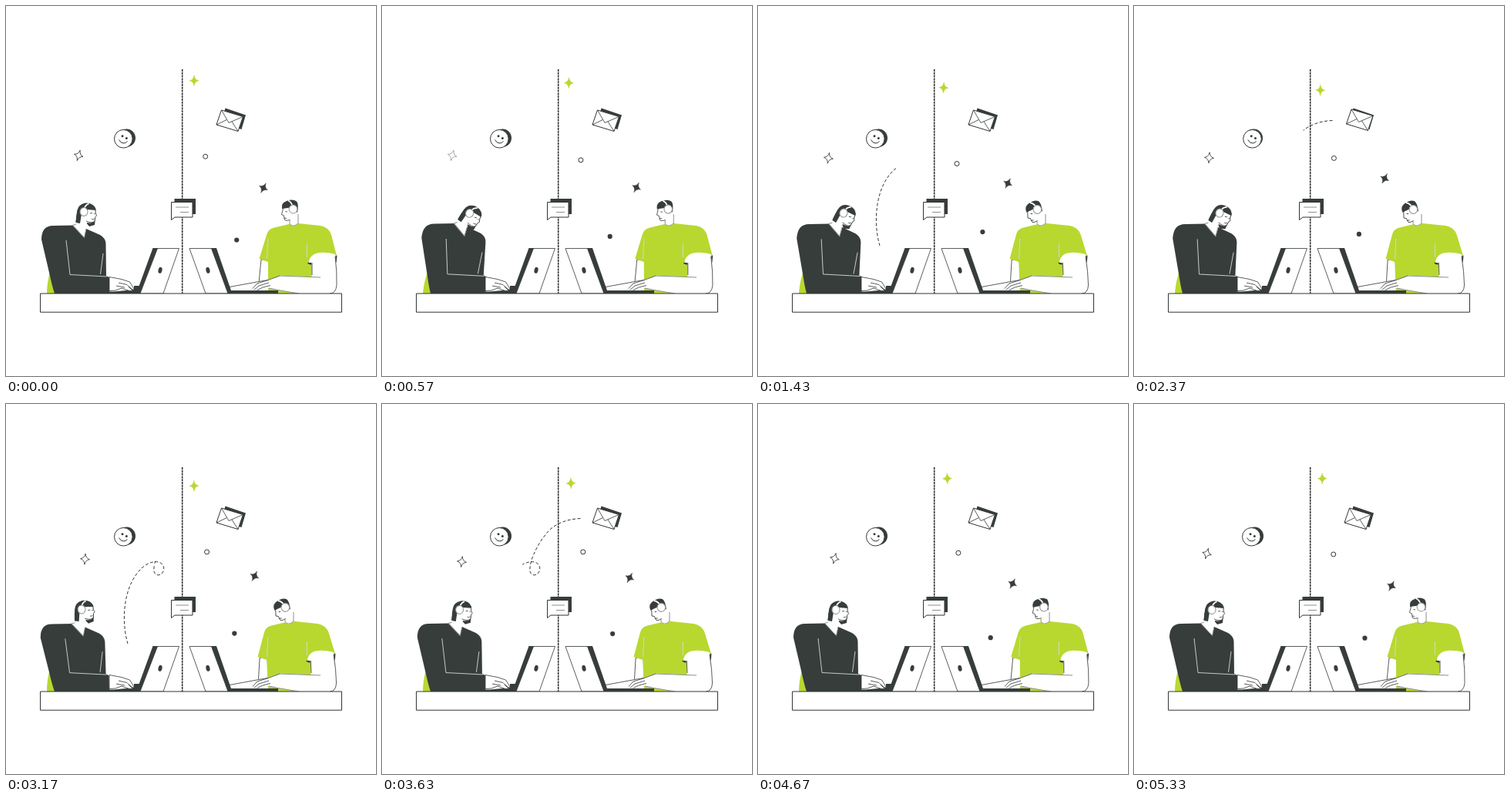
Animation, 480 px wide and 480 px high, one loop 5.37 s. Source, as an HTML page:

```html
<!DOCTYPE html>
<html lang="en">
<head>
<meta charset="utf-8">
<title>Remote chat</title>
<style>
  html, body { margin: 0; width: 100%; height: 100%; overflow: hidden; background: #fff; }
  svg { display: block; width: 100vw; height: 100vh; }
  .d { fill: #373d3b; }
  .g { fill: #b8d830; }
  .w { fill: #fff; }
  .o { fill: #fff; stroke: #303533; }
  .l { fill: none; stroke: #303533; }
  .s { fill: none; stroke: #8b908e; }
  .p { fill: none; stroke: #d5d8d6; stroke-width: .9; }
  .thin { stroke-width: .8; }
  .band { fill: none; stroke: #fff; stroke-width: 1.8; }
</style>
</head>
<body>
<svg viewBox="0 0 480 480" stroke-width="1" stroke-linejoin="round">
  <defs>
    <path id="star" d="M0-7Q.8-1 6 0Q.8 1 0 7Q-.8 1-6 0Q-.8-1 0-7Z"/>
    <path id="route" d="M158 311C152 291 151 262 160 238C166 222 178 207 191 205C201 203 207 210 204 217C201 224 193 223 192 217C190 203 206 172 222 159.500C233 152 245 149 258 148.500"/>
    <mask id="window" maskUnits="userSpaceOnUse" width="480" height="480">
      <use id="visible" href="#route" fill="none" stroke="#fff" stroke-width="4"/>
    </mask>
  </defs>

  <path class="l" d="M228.700 82V373" stroke-width="1.600" stroke-dasharray="3 .8"/>
  <g mask="url(#window)"><use href="#route" class="l" stroke-dasharray="4 2.500"/></g>

  <!-- floating icons -->
  <circle id="smileBack" class="d" cx="156.300" cy="171.300" r="11.700"/>
  <g id="smile">
    <circle class="o" cx="152.300" cy="172.300" r="11.800"/>
    <circle class="d" cx="151" cy="168.700" r="1.500"/><circle class="d" cx="156.300" cy="171.500" r="1.500"/>
    <path class="l" d="M146.500 173.500Q149 178.500 153 178Q156 177.500 157.500 175.500"/>
  </g>
  <path class="d" d="M284.500 132.500L311 141.500L305.500 160L279 152Z"/>
  <g id="mail">
    <path class="o" d="M279.500 135L307.500 143.500L301 162.500L273 154Z"/>
    <path class="l thin" d="M279.500 135L289 151.500L307.500 143.500M273 154L286.500 147.500M301 162.500L293 150"/>
  </g>
  <path class="d" d="M218.500 250H246V270H218.500Z"/>
  <path class="o" d="M214.500 254.500H242V274H219L214.500 277.500Z"/>
  <path class="s" d="M220 261H237M226 267.500H237"/>

  <!-- woman -->
  <g id="womanBody">
    <path class="g" d="M57 345Q53 360 53 373H66Z"/>
    <path class="d" d="M88 284.500L61 285Q46 285 46 303L57 350Q60 364 63 373H134V352L130 350L129.500 308Q129 301 122 297L104 289L101 300Z"/>
    <path class="w" d="M93 278L91 283L86.500 284.500L101.500 300.500L104 290V278Z"/>
    <path class="s" d="M91 283L86.500 284.500L101.500 300.500L104 289"/>
    <path class="p" d="M78 304L83 348.500L131 351M126 321L122.500 348"/>
  </g>
  <g id="womanHead">
    <path class="d" d="M103 255.500Q113 255 116.500 263L116 274L115 284L108 286L103 280L90.500 280Q91 272 92.500 265Q94 257 103 255.500Z"/>
    <path class="w" d="M105 264L116.500 265L116 268L117.500 272L116 273.500L115 279Q112 282.500 105 281L104 288L93 284L97 270Z"/>
    <path class="l thin" d="M116 264V268L117.500 272L116 273.500L115 279Q112 282.500 104 279"/>
    <path class="d" d="M92.500 265L90.500 281L96 282L98 270Z"/>
    <path class="l thin" d="M109 269L112 268.500M114 269.500H115.500M111 276.500Q113 277.500 114.500 276"/>
    <path class="band" d="M102 262Q103 258 107.500 256.500"/>
    <ellipse class="w" cx="101" cy="267" rx="5" ry="5.500" stroke="#8b908e"/>
  </g>
  <path class="d" d="M63 370.500H140L166 368V363H173V373H63Z"/>
  <path class="o thin" d="M134 351.500L150 354.500L160.500 358L166.500 367.500L163 368L159 364L165 369L160 369.500L150 366L142 369L134 369.500Z"/>
  <path class="l thin" d="M146 359L157 361.500L163 367.500M143 363L154 365"/>

  <!-- man -->
  <g id="manBody">
    <path class="o thin" d="M331 329L328 359L341 359V329Z"/>
    <path class="d" d="M425 320L429.500 324L428.500 333L421 326Z"/>
    <path class="g" d="M369 282.500L348 287.500Q340 289 338 297L328.500 328L340 332V373H397V333L429 324L422 297Q419 287 408 285L379 282Z"/>
    <path class="d" d="M391 334L396 328V336Z"/>
    <path class="w" d="M392.500 333C395 318 410 318 427 322Q430 345 429 362Q428 373 420 373H396L397 333Z"/>
    <path class="l thin" d="M397 333V349M427 325Q429.500 345 429 362Q428 373 420 373"/>
  </g>
  <g id="manNeck">
    <path class="w" d="M368 274V282Q372 289 379 282V268Z"/>
    <path class="s" d="M368 277V282.500Q372 288 379 282V270"/>
  </g>
  <path class="p" d="M340 302L338.500 328M390.500 308V326"/>
  <path class="w" d="M410 352L355 349.500L340 355L328 357L290 365V369H322L341 366L353 368.500Q370 372 380 373H420Z"/>
  <path class="l thin" d="M290 364.500L328 357.500L340 355.500L355 350"/>
  <path class="s" d="M354 350L408 352M341 366L353 368.500L380 373"/>
  <path class="l thin" d="M340 355.500L326 360L320 366.500M341 359L328 363L322 368M343 362.500L333 365L326 368.500"/>
  <g id="manHead">
    <path class="w" d="M360 256L359 265L357.500 270.500L360.500 272L361 276Q361 279.500 368.500 278L372 282L378 276V260Z"/>
    <path class="l thin" d="M360 260L359 265L357.500 270.500L360.500 272L361 276Q361 279.500 368.500 277.500"/>
    <path class="d" d="M358 263Q357 255 364 253Q372 250 377 253.500Q380 257 378 268L374 264L369 261.500Z"/>
    <path class="l thin" d="M362.500 266.500L365 267M361 275L364 275.500"/>
    <path class="band" d="M366 252.500Q370 254 371.500 259"/>
    <ellipse class="w" cx="372.500" cy="263.500" rx="5.300" ry="5.500" stroke="#8b908e"/>
  </g>

  <!-- laptops and desk -->
  <path class="d" d="M190.500 314H198L177 373H169Z"/>
  <path class="o thin" d="M196.500 314.500H224.500L204 373H174Z"/>
  <ellipse class="d" cx="200" cy="342.800" rx="2.500" ry="4" transform="rotate(14 200 343)"/>
  <path class="d" d="M265 314H273L292 369H353V373H286Z"/>
  <path class="o thin" d="M238 314.500H266.500L288 373H259Z"/>
  <ellipse class="d" cx="262" cy="342.800" rx="2.500" ry="4" transform="rotate(-14 262 343)"/>
  <rect class="o" x="44.500" y="373" width="391" height="24.200"/>

  <!-- drifting sparkles -->
  <use id="whiteStar" href="#star" class="o thin"/>
  <use id="greenStar" href="#star" class="g" stroke="#b8d830" stroke-width=".5"/>
  <circle id="ring" class="o" r="3"/>
  <use id="darkStar" href="#star" class="d" stroke="#373d3b" stroke-width=".5"/>
  <circle id="dot" class="d" r="3.100"/>
</svg>
<script>
const LOOP = 5370, TRAIL_STARTS = [1100, 2730], DESK = 373;
const el = id => document.getElementById(id);
const move = (id, x, y, turn = 0, pivot = '') =>
  el(id).setAttribute('transform', `translate(${x} ${y}) rotate(${turn} ${pivot})`);
const clamp = x => Math.max(0, Math.min(1, x));
const ease = x => (1 - Math.cos(Math.PI * clamp(x))) / 2;
const length = el('route').getTotalLength();

// Bends a body sideways and upwards while it stays fixed to the desk.
function lean(id, dx, lift) {
  const k = -dx / 83, s = 1 + lift / 88;
  el(id).setAttribute('transform', `matrix(1 0 ${k} ${s} ${-k * DESK} ${DESK * (1 - s)})`);
}

function drawPeople(step) {
  const w = 1.3 * (step(0, 450) - step(2500, 3100)) - .3 * (step(450, 950) - step(3100, 3800));
  const m = step(400, 1150) - step(4150, 4850);
  lean('womanBody', 5 * w, 2 * w);
  move('womanHead', 10 * w, 1.5 * w, 20 * w, '101 267');
  lean('manBody', -3.5 * m, 0);
  move('manNeck', -6 * m, 0);
  move('manHead', -10 * m, .5 * m, -17 * m, '372 264');
}

function drawIcons(step) {
  const press = step(2050, 2350) - step(2450, 2750);
  move('smile', 1.2 * press, 0);
  move('smileBack', -press, 0);
  move('mail', 2.5 * press, -press);
}

function drawSparkles(t, step) {
  // A cosine with whole cycles per loop, highest at the given part of it.
  const wave = (cycles, peak) => Math.cos(2 * Math.PI * cycles * (t / LOOP - peak));
  move('whiteStar', 97 - 6.5 * wave(1, .18), 198.5 + 4.5 * wave(1, .68) - 2.7 * wave(2, 0), 10 + 6 * wave(1, 0));
  move('greenStar', 243.3 + 2.5 * wave(1, .8), 102.7 + 6.5 * wave(1, .43), 3 * wave(1, .25));
  move('ring', 259.3 + 1.5 * wave(1, .68), 196.7 + 6 * wave(1, .24) + 1.9 * wave(2, .27));
  move('darkStar', 326.5 + 4.7 * wave(1, .02) + 3 * wave(2, .47), 229.5 + 6.7 * wave(1, .03), 27);
  move('dot', 296.3 + 5.5 * wave(1, .84), 298.3 + 4.5 * wave(1, .88) + 2 * wave(2, .98));
  el('whiteStar').style.opacity = 1 - .5 * (step(300, 570) - step(570, 850));
}

function drawTrail(t) {
  const u = t - TRAIL_STARTS[t < TRAIL_STARTS[1] ? 0 : 1];
  const head = length * ease(u / 750), tail = length * clamp((u - 530) / 880);
  el('visible').setAttribute('stroke-dasharray', `0 ${tail} ${head - tail} ${2 * length}`);
}

const begin = performance.now();
function frame() {
  const t = (performance.now() - begin) % LOOP;
  const step = (from, to) => ease((t - from) / (to - from));
  drawPeople(step);
  drawIcons(step);
  drawSparkles(t, step);
  drawTrail(t);
  requestAnimationFrame(frame);
}
frame();
</script>
</body>
</html>
```
